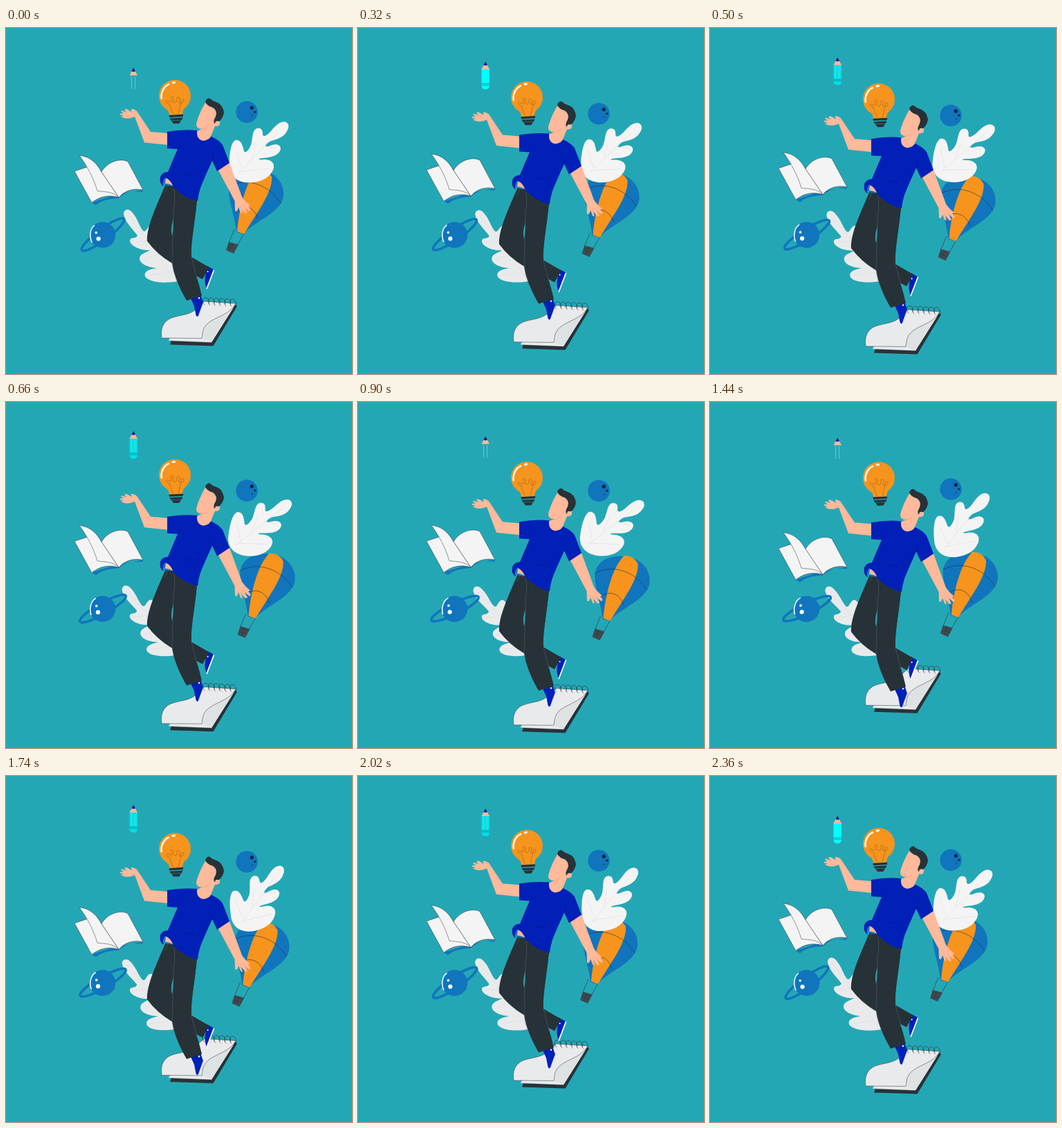
Animation of 500 by 500 pixels, one loop 2380 ms. Source, as an HTML page with a canvas:

```html
<!DOCTYPE html>
<html lang="en">
<head>
<meta charset="utf-8">
<title>Floating ideas</title>
<style>
  html, body { margin: 0; width: 100%; height: 100%; overflow: hidden; background: #24a7b5; }
  canvas { display: block; width: 500px; height: 500px; }
</style>
</head>
<body>
<canvas id="stage" width="500" height="500"></canvas>
<script>
const ctx = document.getElementById('stage').getContext('2d');
const LOOP = 2380;
const C = {
  sky: '#24a7b5', ink: '#273238', navy: '#0020b8', blue: '#1075bd', orange: '#f7941d',
  skin: '#ffb99b', paper: '#f4f4f4', shade: '#e9eaeb', cyan: '#00ffff', teal: '#00dfe4'
};

const fill = (d, color) => { ctx.fillStyle = color; ctx.fill(new Path2D(d)); };
const line = (d, color = C.ink, width = 0.6) => {
  ctx.strokeStyle = color;
  ctx.lineWidth = width;
  ctx.stroke(new Path2D(d));
};
const dot = (x, y, r, color, ry = r, turn = 0) => {
  ctx.fillStyle = color;
  ctx.beginPath();
  ctx.ellipse(x, y, r, ry, turn, 0, Math.PI * 2);
  ctx.fill();
};
const moved = (dx, dy, draw) => {
  ctx.save();
  ctx.translate(dx, dy);
  draw();
  ctx.restore();
};
const turned = (x, y, degrees, draw) => {
  ctx.save();
  ctx.translate(x, y);
  ctx.rotate(degrees * Math.PI / 180);
  ctx.translate(-x, -y);
  draw();
  ctx.restore();
};

const ease = u => (1 - Math.cos(Math.PI * u)) / 2;
const swing = (t, period = LOOP) => ease(2 * t / period);

// Eased value through [time, value] stops, starting and ending at 0.
function track(t, ...stops) {
  let [t0, v0] = [0, 0];
  for (const [t1, v1] of [...stops, [LOOP, 0]]) {
    if (t <= t1) return v0 + (v1 - v0) * ease((t - t0) / (t1 - t0));
    [t0, v0] = [t1, v1];
  }
  return 0;
}

function moon() {
  dot(348, 121.5, 15.7, C.blue);
  dot(355.3, 115.3, 2.6, '#0c2438');
  dot(359.8, 121.3, 1.6, '#0c2438');
  dot(355.8, 126.6, 0.8, '#0c2438');
}

function balloon() {
  fill('M333 295C331 272 320 246 322 229C326 208 347 202 370 205C391 209 403 226 401 243C398 267 359 279 343 298Z', C.blue);
  fill('M364 203.5Q378 203 384 215C386 238 360 270 344 298L334 294C337 262 346 222 364 203.5Z', C.orange);
  line('M322 229C345 216 379 224 397 253M330 263C342 253 359 258 364 276');
  line('M330 291L322 310M344 297L335 313');
  fill('M322 309L336 313L329 326L318 321Z', '#3e4b51');
  line('M321 312L334 316M320 316L332 320M328 311L323 323', '#25323a', 0.5);
}

function rightLeaf() {
  fill('M323 203C322 188 324 164 332 162C340 161 342 170 344 178C346 182 351 176 354 169C357 160 355 147 363 145C370 144 371 149 371 154C372 159 378 154 382 150C388 143 394 135.5 402 135.5C409 136 410 143 406 149C402 157 394 160 387 162C378 164 375 169 375 171C378 173 385 167 392 168.5C400 171 397 179 391 183C383 188 373 187 366 189C364 191 369 190 375 190C386 191 390 198 385 207C379 218 366 223 353 223.5C340 224 326 219 323 203Z', C.paper);
  line('M336 210L355 190L394 150M355 190L361 164M374 171L391 173M337 207L381 203M341 203L332 177', '#dcdfe0', 0.6);
}

function leftLeaf() {
  fill('M170 269C170 262 177 260 182 266C191 276 192 286 198 293C203 297 204 285 211 285C218 287 220 305 228 318L247 342L248 366C235 369 207 369 201 359C199 352 205 349 218 347C206 346 193 341 193 333C193 326 202 325 208 321C195 322 179 315 179 307C180 301 187 306 190 300C183 290 172 281 170 269Z', C.shade);
  line('M176 270L210 312L242 362M183 309L205 307M198 335L220 327M206 357L237 354', '#d6dadb', 0.5);
}

function planet() {
  ctx.strokeStyle = C.blue;
  ctx.lineWidth = 3.6;
  ctx.beginPath();
  ctx.ellipse(140, 298.5, 38, 8, -0.64, 0, Math.PI * 2);
  ctx.stroke();
  dot(139.5, 299, 18.8, C.blue);
  line('M124.5 310C120 302 121 290 128 285', '#fff', 1.5);
  dot(130.3, 295.8, 1.8, '#fff');
  dot(133.6, 304.6, 3.1, '#fff');
}

function book() {
  fill('M124 252L130 256C141 247 152 247 163 246C172 237 184 235 197 237L198 234L162 240Z', C.blue);
  const left = 'M99 207L117 201L140 208L163 245C148 240 134 244 124 252.5Z';
  const right = 'M138 208C145 195 163 187 176 193L198 234C184 231 171 235 163 245Z';
  const turning = 'M106 184C123 186 132 197 138 208L163 245C154 236 144 237 132 235.5C126 215 116 198 106 184Z';
  for (const page of [left, right, turning]) {
    fill(page, C.paper);
    line(page, C.ink, 0.5);
  }
}

function notepad() {
  fill('M239 452L297 454L331 400L334 402L299.5 459.5L237 457.5Z', C.ink);
  fill('M239 445L332 398L297 454.5L234.5 452Z', '#e9ebec');
  line('M235 452L297 454.5L332 399', C.ink, 0.4);
  const sheet = 'M225 448C223 434 227 424 239 419C254 414 266 415 276 405Q281 399 287 395L332 398C321 420 287 417 284 441L283 448.5Z';
  fill(sheet, C.shade);
  fill('M332 399C321 420 287 417 284 441L283 448.5L297 454Z', '#dfe2e3');
  line(sheet, C.ink, 0.5);
  ctx.strokeStyle = C.ink;
  ctx.lineWidth = 0.6;
  for (let i = 0; i < 6; i++) {
    ctx.beginPath();
    ctx.ellipse(289 + i * 7.8, 395.5 + i * 0.4, 4.5, 6, -0.3, 2.4, 7);
    ctx.stroke();
  }
}

function bulb() {
  fill('M230 115Q236 120 236 126L255 125Q255 120 258 115Z', C.orange);
  dot(244, 98, 23, C.orange);
  line('M225 103C223 94 228 84 236 81', '#fff', 2.4);
  dot(242.3, 79, 2.8, '#fff', 1.6, -0.15);
  line('M241 124L236 110C229 108 231 103 235 106C240 110 240 102 238 100C241 97 244 102 241 106C244 110 248 107 247 101C251 98 253 104 249 107C252 110 258 108 257 104C254 101 252 107 253 109L249 124', '#7d5a20', 0.5);
  fill('M235.5 126L256 124.8L256 128L236 129.2Z', C.ink);
  fill('M236.5 130.5L255.5 129.5L254 133L238 133.5Z', C.ink);
  fill('M239 134L253 133.5L250.5 138L242 138.3Z', C.ink);
}

function shoes() {
  fill('M291 344L300 349L290 377Q286 366 288 359Z', C.navy);
  line('M300.5 349.5L290 377', '#fff', 1.7);
  dot(291.5, 352, 1.1, '#fff');
  fill('M267 391L281 385L285 397L278.5 415Q276.5 419 274.5 415L272 402Z', C.navy);
  line('M285 397L278.5 415', '#dfe6ff', 0.6);
  dot(279, 390.2, 1.2, '#fff');
}

function trousers() {
  fill('M232 223L276 248C272 285 267 312 268 331L294 346L284 363L240 340Q218 327 204 308C203 291 213 268 219 253Z', C.ink);
  fill('M242 228L276 248C273 285 266 312 268 331C272 350 279 369 283 387L261 394C250 375 242 355 240 339Z', C.ink);
  fill('M242 276Q237 290 240 301Q242 290 242 276Z', C.sky);
  line('M242 232Q246 240 242 262L240 338Q241 352 247 366M268 331L276 362M233 226Q233 234 229 237', '#5a666c', 0.5);
}

function arms() {
  fill('M186 128C178 132 171 131 166 128L170 126.5L164.5 125.5L165.5 123.5L170 123.5L166 120.5L168 119.5L174 122L171 118L174 117L182 121.5L180.5 117.5Q184 116 189 120L209 150L234 152L234 169L200 165.5Z', C.skin);
  fill('M306 204L323 195L341 244Q346 251 350 254L353 257L350 257.5L354 263L351 264.5L345 259L349 267L346 268L340 261L342 268L339 267L336 259Q334 267 331 264L330.5 250Z', C.skin);
  line('M340 261L338 256M345 259L342 255', '#e08f70', 0.4);
}

function shirt() {
  fill('M223 218Q230 212 243 220L241 228Q229 230 223 218Z', C.blue);
  fill('M231 217L241 221L243 229Q234 224 230 225Z', C.skin);
  fill('M233 150Q254 146 276 148Q287 155 297 157Q308 162 313 169L323 195L305 207L298 192Q286 218 281 231Q278 240 277 250Q259 247 242 230Q238 219 230 216Q225 221 228 229Q221 225 223 215Q226 208 234 208Q241 191 248 175L233 174Z', C.navy);
  line('M298 192L301 181M248 175L251 169M257 210Q265 215 273 212', '#081579', 0.6);
}

function head() {
  fill('M288 108Q279 123 275 138Q274 145 283 146L276 149Q275 161 285 163Q295 162 297 154L302 142Q309 142 309 136L309 116Z', C.skin);
  line('M282 146Q288 146 292 143', '#ee9674', 0.6);
  fill('M288 107Q289 101.5 294 101.5Q299 106 304 107Q313 110 315 122Q314 130 307 136Q303 138 301 138Q299 134 303 128Q306 120 299 115Q291 113 288 107Z', C.ink);
  dot(305.5, 138, 3.4, C.skin);
}

function man() {
  shoes();
  trousers();
  arms();
  shirt();
  head();
}

function pencil(t) {
  const hidden = t < 20 || (t > 900 && t < 1700);
  const dim = t > 480 && t < 2190;
  if (!hidden) {
    fill('M178.5 68H190V92Q190 97.5 184.2 97.5Q178.5 97.5 178.5 92Z', dim ? C.teal : C.cyan);
    line('M178.5 89.5H190M178.5 91.5H190', '#176b78', 0.6);
  }
  if (hidden || dim) line('M181.5 70V88M186.5 70V88', '#8ad9df', 0.7);
  fill('M184.2 58L190 68.5H178.5Z', C.skin);
  fill('M184.2 57.5L187 62.5Q184.2 64 181.5 62.5Z', '#101a8e');
}

function frame() {
  const t = performance.now() % LOOP;
  ctx.fillStyle = C.sky;
  ctx.fillRect(0, 0, 500, 500);

  moved(0, -16 * swing(t, LOOP / 2), () => pencil(t));
  moved(0, track(t, [793, 7]), moon);
  const drift = track(t, [930, 1]);
  moved(20.5 * drift, 18.5 * drift, balloon);
  turned(359, 184, track(t, [870, 8], [1666, -8.5]), rightLeaf);
  turned(222, 312, -5.5 * swing(t), leftLeaf);
  turned(139.5, 299, 12 * swing(t), planet);
  moved(0, track(t, [820, -6.3], [1620, 6]), book);
  moved(0, track(t, [857, 19], [1666, -16]), notepad);
  moved(0, 13 * swing(t), bulb);
  moved(0, 27 * swing(t), man);
  requestAnimationFrame(frame);
}
frame();
</script>
</body>
</html>
```
